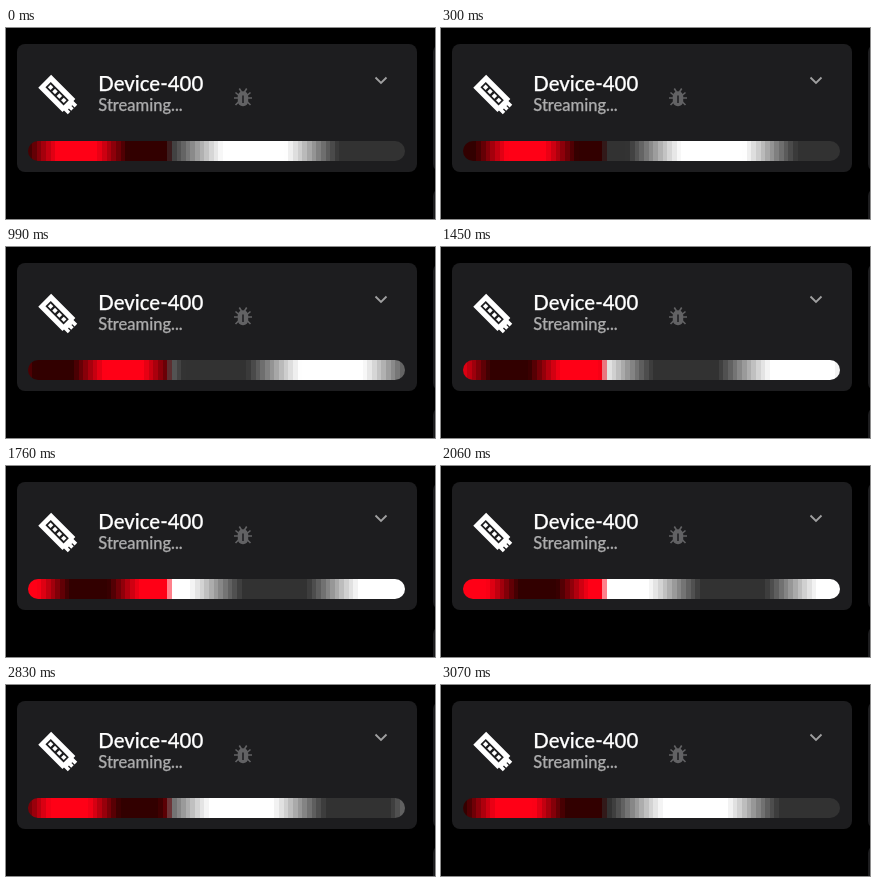
Animation, 429 px wide and 191 px high, one loop 3.15 s. Source, as an HTML page:

```html
<!DOCTYPE html>
<html lang="en">
<head>
<meta charset="utf-8">
<title>Device card</title>
<style>
  html, body { margin: 0; width: 100%; height: 100%; overflow: hidden; background: #000; }
  .stage { position: relative; width: 429px; height: 191px; overflow: hidden; }
  svg { position: absolute; left: 0; top: 0; }
  text { font-family: Lato, "Open Sans", sans-serif; font-weight: 500; stroke-width: 0.25; }
  .strip {
    position: absolute; left: 21.5px; top: 113px; width: 377.5px; height: 20px;
    display: flex; border-radius: 10px; overflow: hidden;
  }
  .strip i { flex: 1; }
</style>
</head>
<body>
<div class="stage">
  <svg width="429" height="191" viewBox="0 0 429 191">
    <g fill="#1d1d1f">
      <rect x="11" y="16" width="400" height="128" rx="8"/>
      <rect x="427" y="16" width="400" height="128" rx="8"/>
      <rect x="427" y="160" width="400" height="128" rx="8"/>
    </g>

    <!-- LED strip icon -->
    <g transform="translate(38.7 53.3) rotate(45) scale(1.07)">
      <path fill="#fff" d="M0-8.5H32V-6H37V-2.5H34V-1.3H37V2H34V3.2H37V6.5H32V8.5H0Z"/>
      <path d="M4.5 0H28.4" stroke="#1d1d1f" stroke-width="7"/>
      <path d="M6 0H28" stroke="#fff" stroke-width="3.6" stroke-dasharray="3.6 2.2"/>
    </g>

    <text x="92.3" y="62.5" font-size="20.4" fill="#fff" stroke="#fff">Device-400</text>
    <text x="92.3" y="83" font-size="16.5" fill="#acacad" stroke="#acacad">Streaming...</text>

    <!-- bug icon -->
    <g stroke="#626264" stroke-width="1.6" fill="none">
      <path d="M233.3 60.5L235.5 64M240.7 60.5L238.5 64M228 70H246M229.5 64.5L233 67.5M244.5 64.5L241 67.5M229.5 77L233 73.5M244.5 77L241 73.5"/>
      <rect x="231.8" y="63.2" width="10.4" height="15" rx="5" fill="#626264" stroke="none"/>
      <path d="M237 67.5V75" stroke="#1d1d1f" stroke-width="1.5"/>
    </g>

    <path d="M369.5 49.5L375 55L380.5 49.5" fill="none" stroke="#a0a0a1" stroke-width="1.8"/>
  </svg>
  <div class="strip"></div>
</div>
<script>
  const RED = 30, WHITE = 50, LOOP = 3150, PERIOD = 3000;
  // how long each streamed update stays, in hundredths of a second
  const holds = [7, 8, 7, 8, 8, 7, 8, 7, 8, 16, 7, 8, 7, 8, 8, 7, 8, 8, 7, 8, 8, 8, 7, 8,
    15, 16, 7, 8, 8, 7, 8, 8, 15, 8, 8, 8, 8];

  const strip = document.querySelector('.strip');
  const cells = Array.from({ length: RED + 1 + WHITE }, () => strip.appendChild(document.createElement('i')));

  // brightness of a clipped cosine wave
  function level(pos, peak) {
    const wave = 0.5 + 0.75 * Math.cos(2 * Math.PI * (pos - peak));
    return 50 + 205 * Math.min(1, Math.max(0, wave));
  }

  const red = v => [v, 0, 22 * (v - 50) / 205];
  const white = v => [v, v, v];
  const mix = (a, b) => a.map((v, i) => (v + b[i]) / 2);

  function colour(i, peak) {
    if (i < RED) return red(level((i + 0.5) / RED, peak));
    if (i > RED) return white(level((i - RED - 0.5) / WHITE, peak));
    return mix(red(level(1, peak)), white(level(0, peak)));
  }

  function updateStart(t) {
    let start = 0;
    for (const hold of holds) {
      if (t < start + hold * 10) break;
      start += hold * 10;
    }
    return start;
  }

  let shown = -1;
  function draw() {
    const start = updateStart(performance.now() % LOOP);
    if (start !== shown) {
      shown = start;
      const peak = 0.355 + start / PERIOD;
      cells.forEach((cell, i) => {
        cell.style.background = `rgb(${colour(i, peak).map(Math.round)})`;
      });
    }
    requestAnimationFrame(draw);
  }
  draw();
</script>
</body>
</html>
```
